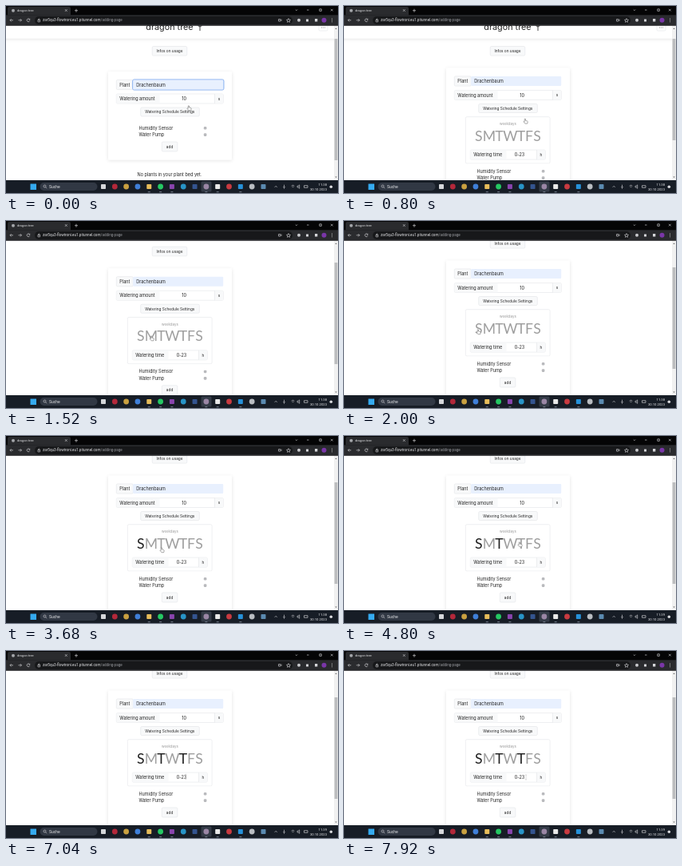
Animation of 416x234 px, one loop 8000 ms. Source, as an HTML page:

```html
<!DOCTYPE html>
<html lang="en">
<head>
<meta charset="utf-8">
<title>Plant settings</title>
<style>
html, body { margin: 0; width: 100%; height: 100%; overflow: hidden; background: #fff }
svg { display: block; width: 416px; height: 234px }
text { font: 5.5px Inter, "Open Sans", sans-serif; fill: #222 }
.mid { text-anchor: middle }
.small { font-size: 4.75px }
.days text { font: 400 17.6px Lato, Inter, sans-serif; text-anchor: middle }
.box { fill: #fff; stroke: #e3e4e7; stroke-width: .6 }
.label { fill: #f8f9fa; stroke: #e3e4e7; stroke-width: .6 }
.chrome text { font: 4.6px Roboto, sans-serif; fill: #e4e5e7 }
.line { fill: none; stroke: #d5d6d9; stroke-width: .65 }
</style>
</head>
<body>
<svg viewBox="0 0 416 234">
  <defs>
    <filter id="soft" x="-10%" y="-10%" width="120%" height="130%">
      <feDropShadow dx="0" dy="1" stdDeviation="2" flood-color="#000" flood-opacity=".11"/>
    </filter>
    <clipPath id="reveal"><rect id="revealRect" x="150" y="142" width="111" height="0"/></clipPath>
  </defs>
  <rect width="416" height="234" fill="#fff"/>

  <g id="page">
    <rect x="-10" y="-20" width="436" height="60.5" fill="#fff" filter="url(#soft)"/>
    <text x="205" y="29.6" class="mid" style="font-size:10.8px">dragon tree</text>
    <path d="M243 31v-7m-2.6-2q0 4 2.6 4t2.6-4" fill="none" stroke="#333" stroke-width=".9"/>
    <rect x="392" y="20" width="11" height="11" rx="1.5" class="box"/>
    <path d="M395 27h5" stroke="#777" stroke-width=".8" stroke-dasharray="1"/>
    <rect x="183.2" y="50.5" width="43.6" height="11.6" rx="1.5" class="label"/>
    <text x="205" y="58.2" class="mid small">Infos on usage</text>

    <g id="card">
      <rect id="cardRect" x="128" y="82" width="155" height="110.5" rx="2" fill="#fff" filter="url(#soft)"/>
      <rect x="138.3" y="92.4" width="21" height="12.2" rx="1.5" class="label"/>
      <text x="142.3" y="100.5">Plant</text>
      <rect id="focus" x="158.6" y="91.9" width="114.4" height="13.2" rx="2" fill="#b8d2fb" stroke="#7ea9ee" stroke-width=".8"/>
      <rect x="159.2" y="92.5" width="113" height="12" rx="1.2" fill="#e8f0fe"/>
      <text x="163.2" y="100.5">Drachenbaum</text>

      <rect x="138.3" y="110" width="134" height="12" rx="1.5" class="box"/>
      <path d="M138.6 110.300h54v11.400h-54zM261.500 110.300h10.500v11.400h-10.500z" fill="#f8f9fa"/>
      <path d="M261.500 110v12" stroke="#e3e4e7" stroke-width=".6"/>
      <text x="142.3" y="118.2">Watering amount</text>
      <text x="223" y="118.2" class="mid">10</text>
      <text x="267" y="117.9" class="mid small">s</text>
      <rect x="168.700" y="127" width="73.600" height="11" rx="1.5" class="label"/>
      <text x="205.300" y="134.300" class="mid small">Watering Schedule Settings</text>

      <g clip-path="url(#reveal)">
        <rect x="152.3" y="143.2" width="105.8" height="58.3" rx="1.8" class="box"/>
        <text x="205.3" y="153.4" class="mid" style="font-size:4.4px;fill:#999">weekdays</text>
        <g id="days" class="days"></g>
        <rect x="158.3" y="184.6" width="94" height="12" rx="1.5" class="box"/>
        <path d="M158.6 184.9h45v11.4h-45zM241.5 184.9h10.5v11.4h-10.5z" fill="#f8f9fa"/>
        <path d="M241.5 184.7v11.8" stroke="#e3e4e7" stroke-width=".6"/>
        <text x="162.2" y="192.5">Watering time</text>
        <text x="220" y="192.5" class="mid">0-23</text>
        <text x="247" y="192.4" class="mid small">h</text>
      </g>

      <g id="low">
        <text x="166.4" y="154.5">Humidity Sensor</text>
        <text x="166.4" y="163">Water Pump</text>
        <rect x="247.8" y="150.9" width="3.6" height="3.6" rx="1.2" fill="#b9babd"/>
        <rect x="247.8" y="159.3" width="3.6" height="3.6" rx="1.2" fill="#b9babd"/>
        <rect x="195.3" y="170" width="19.6" height="12" rx="1.5" class="label"/>
        <text x="205.1" y="177.6" class="mid small">add</text>
        <text x="205" y="213" class="mid">No plants in your plant bed yet.</text>
      </g>
    </g>
  </g>

  <rect x="411" y="24" width="5" height="194" fill="#f1f1f1"/>
  <rect id="thumb" x="411.6" width="3.8" fill="#bcbdbf"/>
  <path d="M412.3 29l1.2-1.6 1.2 1.6zM412.3 213.5l1.2 1.6 1.2-1.6z" fill="#666"/>

  <g id="pointer">
    <path id="hand" d="M-.8 0q.8-.8 1.300 0v2l2.200.6q.6.300.5.900l-.5 2.200h-2.800l-1.900-2.400.5-.5.700.4z" fill="#fff" stroke="#444" stroke-width=".45"/>
    <path id="beam" d="M-1-3h2m-1 0v6m-1 0h2" fill="none" stroke="#aaa" stroke-width=".4"/>
  </g>

  <g class="chrome">
    <rect width="416" height="24.5" fill="#050506"/>
    <path d="M2 11.5V3q0-2 2-2h75q2 0 2 2v8.5z" fill="#2a2b2e"/>
    <rect y="11.3" width="416" height="13.2" fill="#2a2b2e"/>
    <rect x="36" y="13" width="323" height="10" rx="5" fill="#17181a"/>
    <circle cx="9" cy="5.7" r="2" fill="#a4a6aa"/>
    <text x="14" y="7.300" style="font-size:4.100px">dragon tree</text>
    <path d="M74 4.200l2.600 2.600m0-2.600l-2.600 2.600M86 5.700h4m-2-2v4" class="line"/>
    <path d="M362.800 4.500l1.200 1.200 1.200-1.200M377 5h2.500M392.800 3.800h2.500v2.500h-2.500zM407 3.800l2.600 2.600m0-2.600l-2.600 2.600" class="line"/>
    <path d="M9 17.800h-4m1.700-1.700l-1.700 1.700 1.700 1.700M15.500 17.800h4m-1.700-1.700l1.700 1.700-1.700 1.700M29.600 16.700a1.900 1.900 0 1 0 .2 1.800m0-2.700v1.400h-1.500" class="line"/>
    <path d="M40 17.500h2.600v2.300h-2.600zm.5 0v-1q.8-1.300 1.600 0v1" class="line"/>
    <text x="46" y="19.400">zar5qu3-flowtroni.eu1.pitunnel.com<tspan fill="#9a9ca0">/adding-page</tspan></text>
    <path d="M341.500 16.500h2.300v2.500h-2.300zm3.500 0v2.500M354 15.600l.7 1.600 1.800.2-1.300 1.200.3 1.700-1.500-.9-1.500.9.300-1.700-1.300-1.200 1.800-.2z" class="line"/>
    <circle cx="367" cy="17.800" r="2" fill="#c9cacd"/>
    <path d="M376 16.400h3v3h-3zM387 16h3.300v3.600h-3.300z" fill="#d5d6d9"/>
    <circle cx="398.500" cy="17.800" r="3" fill="#7a36a8"/>
    <path d="M408.500 15.500v4.800" stroke="#ddd" stroke-width=".8" stroke-dasharray="1"/>

    <rect y="218" width="416" height="16" fill="#171d26"/>
    <rect x="30.500" y="222.500" width="7.500" height="7.500" fill="#35aaf0"/>
    <rect x="42.500" y="221" width="72" height="10" rx="5" fill="#313844"/>
    <circle cx="48.500" cy="225.500" r="1.500" class="line"/>
    <path d="M49.600 226.700l1.500 1.500" class="line"/>
    <text x="54" y="227.800" style="font-size:5px">Suche</text>
    <g id="icons"></g>
    <path d="M336.700 226.800l1.500-1.500 1.500 1.500M348.500 223.700v2.800m-1.300-.5q1.300 2.700 2.600 0m-1.300 1.200v1.500M357.700 225.200q1.800-1.800 3.600 0m-2.700 1.500q.9-.9 1.800 0M365 225.200h1.300l1.400-1.300v4.400l-1.400-1.300h-1.300zM373.500 224.700h4.500v2.600h-4.500z" class="line"/>
    <text id="clock" x="402" y="224.800" text-anchor="end" style="font-size:4.200px"></text>
    <text x="402" y="230.600" text-anchor="end" style="font-size:4.200px">30.10.2023</text>
    <circle cx="407.300" cy="226.300" r="1.800" fill="#d9dadd"/>
  </g>
</svg>
<script>
const LOOP = 8000;
const $ = id => document.getElementById(id);
const set = (el, attrs) => { for (const k in attrs) el.setAttribute(k, attrs[k]); };
const add = (parent, tag, attrs) => {
  const el = document.createElementNS("http://www.w3.org/2000/svg", tag);
  set(el, attrs);
  return parent.appendChild(el);
};
const ramp = (t, from, to) => {
  const p = Math.min(1, Math.max(0, (t - from) / (to - from)));
  return p * p * (3 - 2 * p);
};

const centers = [168.8, 182, 194.5, 208.3, 222, 232, 242];
const days = [..."SMTWTFS"].map((letter, i) => {
  const el = add($("days"), "text", { x: centers[i], y: 173.1 });
  el.textContent = letter;
  return el;
});
// Click time by weekday index
const clicks = { 0: 2480, 2: 3920, 4: 4960 };

// Taskbar apps: "s" marks a square, the rest are circles.
const apps = ["s#d5d7da", "#b3283a", "#c9a040", "#3f7fd8", "s#e6bc5a", "#25c863", "s#8944ad", "#2894c7",
  "s#34548f", "#9a86a5", "s#e9e9e9", "#c93a40", "s#2691d9", "#b9bdc2", "s#5b8ab0"];
add($("icons"), "rect", { x: 244.5, y: 219.5, width: 13, height: 13, rx: 1.5, fill: "#343b47" });
apps.forEach((app, i) => {
  const x = 122 + i * 14.32, square = app[0] === "s", fill = app.replace("s", "");
  if (square) add($("icons"), "rect", { x: x - 3, y: 223, width: 6, height: 6, rx: .8, fill });
  else add($("icons"), "circle", { cx: x, cy: 226, r: 3.4, fill });
});
for (const i of [4, 5, 6, 9, 10, 12])
  add($("icons"), "rect", { x: 120.5 + i * 14.32, y: 232.3, width: 3, height: .8, fill: "#8a94a3" });

// Pointer path: time, x, y
const path = [
  [0, 229, 125], [560, 229, 126], [1120, 224, 165], [1680, 172, 139], [2000, 168, 136],
  [3200, 169, 137], [3680, 195, 140], [4080, 195, 139], [4800, 220, 133], [5280, 220, 135],
  [6080, 161, 140], [6480, 163, 141], [7120, 228, 158], [LOOP, 228, 158]
];
function pointerAt(t) {
  const i = path.findIndex(p => p[0] > t), [t0, x0, y0] = path[i - 1], [t1, x1, y1] = path[i];
  const p = ramp(t, t0, t1);
  return [x0 + (x1 - x0) * p, y0 + (y1 - y0) * p];
}

function draw(t) {
  const open = ramp(t, 400, 800), scroll = ramp(t, 1280, 1680);
  set($("page"), { transform: `translate(0 ${-28 * scroll})` });
  set($("card"), { transform: `translate(0 ${-4.5 * open})` });
  set($("low"), { transform: `translate(0 ${58.5 * open})` });
  set($("cardRect"), { height: 110.5 + 58.5 * open });
  set($("revealRect"), { height: 60 * open });
  set($("focus"), { opacity: 1 - ramp(t, 320, 480) });
  set($("thumb"), { y: 41 + 17 * scroll, height: 152 - 25 * open });
  days.forEach((el, i) => {
    const v = Math.round(158 - 126 * (i in clicks ? ramp(t, clicks[i], clicks[i] + 160) : 0));
    el.style.fill = `rgb(${v},${v},${v})`;
  });
  set($("pointer"), { transform: `translate(${pointerAt(t)})` });
  const typing = t > 6960;
  set($("hand"), { opacity: typing ? 0 : 1 });
  set($("beam"), { opacity: typing ? 1 : 0 });
  $("clock").textContent = t < 4000 ? "11:38" : "11:39";
}

const start = performance.now();
function tick() {
  draw((performance.now() - start) % LOOP);
  requestAnimationFrame(tick);
}
tick();
</script>
</body>
</html>
```
